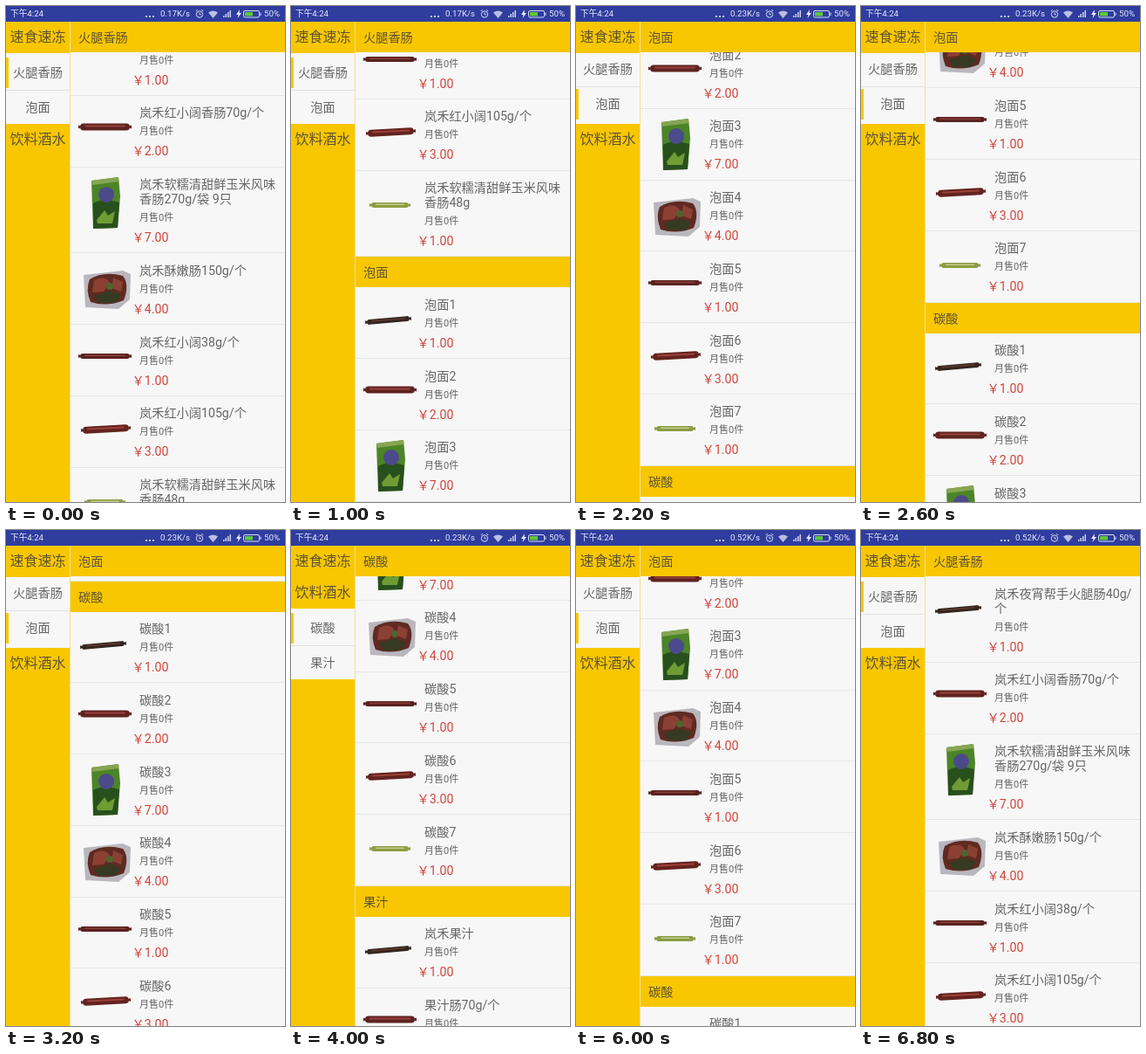
Write an HTML page that moves like this. It is 320x568 px and loops after 7 s.

```html
<!DOCTYPE html>
<html lang="zh-CN">
<head>
<meta charset="utf-8">
<title>点餐列表</title>
<style>
html, body { margin: 0; width: 100%; height: 100%; overflow: hidden; }
body {
  position: relative; color: #666;
  font: 14.2px/17px Roboto, "Noto Sans CJK SC", "Noto Sans CJK", sans-serif;
}
#stage { position: absolute; left: 0; top: 0; width: 320px; height: 568px; overflow: hidden; background: #f7e08c; }
#bar { position: absolute; left: 0; top: 0; width: 320px; height: 18px; background: #2f3d9f; color: #e9ebfb; font-size: 9.7px; line-height: 18px; white-space: nowrap; }
#bar span { position: absolute; top: 0; }
#bar svg { position: absolute; left: 0; top: 0; }
#menu { position: absolute; left: 0; top: 18px; width: 73px; height: 550px; background: #f8c700; text-align: center; white-space: nowrap; }
.group { height: 36px; line-height: 36px; font-size: 16px; color: #5e5233; }
.kids { display: none; background: #f7f7f7; }
.kids.open { display: block; }
.kid { position: relative; height: 40.5px; line-height: 40.5px; }
.kid span { position: relative; top: var(--dy); }
.kid + .kid::after { content: ""; position: absolute; left: 0; right: 0; top: var(--dy); height: 1px; background: #e2e2e2; }
.kid.on::before { content: ""; position: absolute; left: 0; top: calc(var(--dy) + 3px); width: 3px; height: 35px; background: #f8c700; }
#list { position: absolute; left: 74px; top: 18px; width: 246px; height: 550px; overflow: hidden; background: #f7f7f7; }
#rows { position: relative; }
.head { position: relative; z-index: 1; height: 35px; line-height: 36px; padding-left: 9px; background: #f8c700; color: #5e5233; }
.item { position: relative; padding: 11.5px 0 9.25px 79px; box-shadow: inset 0 -1px #e4e7e9; white-space: nowrap; }
.item svg { position: absolute; left: 0; top: 0; }
.sale { font-size: 11px; line-height: 26px; }
.price { margin-left: -8.5px; line-height: 18px; color: #d2443c; }
#glow { position: absolute; left: 74px; top: 518px; }
</style>
</head>
<body>
<div id="stage">
  <div id="menu"></div>
  <div id="list"><div id="rows"></div></div>
  <svg id="glow" width="246" height="50"><path d="M0 34Q123 0 246 30V50H0Z" fill="#3f6bb0" fill-opacity=".17"/></svg>
  <div id="bar">
    <span style="left:5px">下午4:24</span>
    <span id="speed" style="left:177px"></span>
    <span style="left:296px">50%</span>
    <svg width="320" height="18" fill="none" stroke="#d8dcf4">
      <g fill="#e9ebfb" stroke="none">
        <circle cx="161" cy="12" r="1.1"/><circle cx="165" cy="12" r="1.1"/><circle cx="169" cy="12" r="1.1"/>
        <path d="M232 7.500Q237.500 3.500 243 7.500L237.500 14Z" fill-opacity=".75"/>
        <path d="M249 13v-2h1.500v2zM251.500 13v-4h1.500v4zM254 13v-6h1.500v6zM256.500 13v-8h1.500v8z" fill-opacity=".85"/>
        <path d="M268 4l-4 6h2.500l-1 4 4.500-6h-2.500z"/>
      </g>
      <circle cx="222" cy="9.500" r="3.700"/>
      <path d="M222 7.500v2.300h1.800M217.800 6l2-2M226.200 6l-2-2"/>
      <rect x="272.500" y="5.500" width="18" height="7.500" rx="1.500"/>
      <path d="M292 7.500v3.500"/>
      <rect x="274" y="7" width="9" height="4.500" fill="#5fc63c" stroke="none"/>
    </svg>
  </div>
</div>
<script>
const $ = id => document.getElementById(id);
const all = selector => [...document.querySelectorAll(selector)];

function sausage(x, end, y, h, tilt, skin, shine) {
  const w = end - x, mid = x + w / 2;
  return `<g transform="rotate(${tilt} ${mid} ${y})">
    <path d="M${x} ${y - 2}l5 2-5 2zM${end} ${y - 2}l-5 2 5 2z" fill="${skin}"/>
    <rect x="${x + 2}" y="${y - h / 2}" width="${w - 4}" height="${h}" rx="${h / 2}" fill="${skin}"/>
    <rect x="${x + 7}" y="${y - h / 4}" width="${w - 14}" height="${h / 4}" rx="1" fill="${shine}"/></g>`;
}

const pouch = `<path d="M24 15L55 11 57 33 54 69 26 70 25 45Z" fill="#4c8428"/>
  <path d="M24 15L55 11 55.500 16 25 20Z" fill="#86a552"/>
  <path d="M26 41Q38 34 56 40L54 69 26 70Z" fill="#28501d"/>
  <circle cx="41" cy="31" r="9" fill="#4b4a8a"/>
  <path d="M30 60l9-11 4 6 8-5-3 14H31z" fill="#6f9c33"/>`;

const tray = `<path d="M15 25L60 20 69 24 68 53 55 64 17 62Z" fill="#b9b7bd"/>
  <path d="M22 30Q38 20 60 26 68 36 61 54 42 62 23 56 17 42 22 30Z" fill="#5f2a22"/>
  <path d="M27 31Q40 25 45 34L38 44 25 45ZM49 28L60 33 58 44 47 40Z" fill="#8c4033"/>
  <path d="M27 49L45 43 58 48 52 57 32 57Z" fill="#373a22"/>
  <circle cx="45" cy="38" r="4" fill="#4f6430"/>`;

const art = [
  sausage(11, 64, 38, 6, -5, "#33261f", "#5f392c"),
  sausage(9, 70, 35.5, 8, 0, "#5f2321", "#97403a"),
  pouch,
  tray,
  sausage(9, 70, 36, 6, 0, "#582220", "#8b3c36"),
  sausage(12, 69, 37.5, 8, -3, "#63231f", "#9c4038"),
  sausage(16, 63, 39, 6, 0, "#8b9d45", "#c6cb88")
];
const prices = [1, 2, 7, 4, 1, 3, 1];
const numbered = name => prices.map((_, i) => name + (i + 1));

const sections = [
  ["火腿香肠", ["岚禾夜宵帮手火腿肠40g/<br>个", "岚禾红小阔香肠70g/个", "岚禾软糯清甜鲜玉米风味<br>香肠270g/袋 9只",
    "岚禾酥嫩肠150g/个", "岚禾红小阔38g/个", "岚禾红小阔105g/个", "岚禾软糯清甜鲜玉米风味<br>香肠48g"]],
  ["泡面", numbered("泡面")],
  ["碳酸", numbered("碳酸")],
  ["果汁", ["岚禾果汁", "果汁肠70g/个", "双果汁味香肠270g/袋 9<br>只", "岚禾果汁50g/个",
    "岚禾果汁8g/个", "岚禾果汁5g/个", "岚禾果汁香肠48g"]]
];

$("rows").innerHTML = sections.map(([name, items]) =>
  `<section><div class="head">${name}</div>` + items.map((title, i) =>
    `<div class="item"><svg width="78" height="80">${art[i]}</svg>
      <div>${title}</div><div class="sale">月售0件</div><div class="price">￥${prices[i]}.00</div></div>`
  ).join("") + "</section>").join("");

$("menu").innerHTML = ["速食速冻", "饮料酒水"].map((name, g) =>
  `<div class="group">${name}</div><div class="kids">` +
  sections.slice(g * 2, g * 2 + 2).map(s => `<div class="kid"><span>${s[0]}</span></div>`).join("") +
  "</div>").join("");

const kids = all(".kid");
const folds = all(".kids");
const heads = all(".head");
const blocks = all("section").map(s => ({ top: s.offsetTop, room: s.offsetHeight - 35 }));

// [ms, scroll offset]
const path = [[0, 49], [1000, 389], [2200, 757], [3200, 1225], [4000, 1483], [4900, 1946],
  [5200, 1946], [5600, 1480], [6200, 420], [6600, 0], [6800, 0], [7000, 49]];

function track(t) {
  const i = path.findIndex(p => p[0] > t);
  const [t0, y0] = path[i - 1], [t1, y1] = path[i];
  return y0 + (y1 - y0) * (t - t0) / (t1 - t0);
}

function draw() {
  const t = Math.floor(performance.now() % 7000 / 200) * 200;
  const y = Math.round(track(t));
  const current = blocks.filter(b => b.top <= y).length - 1;
  $("rows").style.transform = `translateY(${-y}px)`;
  // Headers stick to the top until their section runs out.
  heads.forEach((h, i) => {
    const { top, room } = blocks[i];
    h.style.top = Math.max(0, Math.min(y - top, room)) + "px";
  });
  kids.forEach((k, i) => k.classList.toggle("on", i === current));
  folds.forEach((f, i) => f.classList.toggle("open", i === current >> 1));
  $("menu").style.setProperty("--dy", (current % 2 ? -2.5 : 1.5) + "px");
  $("speed").textContent = (t < 1600 ? "0.17" : t < 6000 ? "0.23" : "0.52") + "K/s";
  $("glow").style.opacity = Math.max(0, 1 - Math.abs(t - 5000) / 400);
  requestAnimationFrame(draw);
}
draw();
</script>
</body>
</html>
```
